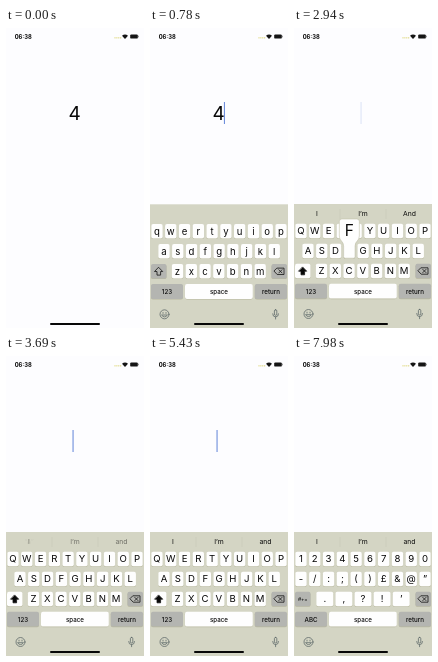
These frames come from a looping animation (138 px wide and 300 px high, 8 s). An HTML page:

```html
<!DOCTYPE html>
<html lang="en">
<head>
<meta charset="utf-8">
<title>Number field</title>
<style>
html, body { margin: 0; width: 100%; height: 100%; overflow: hidden; background: #fdfdff; }
svg { display: block; width: 138px; height: 300px; }
text { font-family: Inter, Roboto, sans-serif; text-anchor: middle; fill: #080808; }
.line { fill: none; stroke: #141414; stroke-width: .8; stroke-linejoin: round; stroke-linecap: round; }
.soft { fill: none; stroke: #5f6a6a; stroke-width: .8; stroke-linecap: round; }
</style>
</head>
<body>
<svg id="stage" viewBox="0 0 138 300"></svg>
<script>
const LOOP = 8000, WHITE = '#fefefe', GREY = '#b4b5b1', BOARD = '#d4d5c4';
const DELETE_AT = 1150, NUMBERS_AT = 7640;
const TYPED = 'AKSQFLDAJHVQDLFAKSQLGSLD', FIRST = 1945, STEP = 235, HOLD = 85;
const LETTERS = ['QWERTYUIOP', 'ASDFGHJKL', 'ZXCVBNM'];
const PITCH = 13.78;

const stage = document.getElementById('stage');
const clamp = v => Math.max(0, Math.min(1, v));
const ramp = (t, a, b) => clamp((t - a) / (b - a));

const label = (s, x, y, size, extra = '') =>
  `<text x="${x}" y="${y}" font-size="${size}" ${extra}>${s}</text>`;
const small = (s, x, y = 265.6) => label(s, x, y, 6.2, 'font-weight="500"');
const box = (x, y, w, h, fill, extra = '') =>
  `<rect x="${x}" y="${y}" width="${w}" height="${h}" rx="1.9" fill="${fill}" ${extra}/>`;
const key = (x, y, w, h, fill, extra = '') =>
  box(x, y + .6, w, h, '#b8b89e') + box(x, y, w, h, fill, extra);

function row(chars, x, y, pitch = PITCH, w = 11.4, size = 9.6) {
  return [...chars].map((c, i) => {
    const cx = x + i * pitch;
    return key(cx - w / 2, y, w, 14.4, WHITE) +
      label(c.replace('&', '&amp;'), cx, y + 10.5, size);
  }).join('');
}

const rowX = [7, 14, 27.5], rowY = [195.8, 215.8, 235.8];
const letterRows = f => LETTERS.map((s, i) => row(f(s), rowX[i], rowY[i])).join('');
const arrow = fill =>
  `<path class="line" style="fill:${fill}" d="M8.8 239.2 L12.7 243.2 H10.6 V246.8 H7 V243.2 H4.9 Z"/>`;
const cap = (fill, inner) => key(1, rowY[2], 15.5, 14.4, fill) + inner;

const layers = {
  lower: letterRows(s => s.toLowerCase()) + cap(GREY, arrow('none')) + small(123, 17),
  upper: letterRows(s => s) + cap(WHITE, arrow('#080808')) + small(123, 17),
  digits: row('1234567890', 7, rowY[0]) + row('-/:;()£&@”', 7, rowY[1]) +
    row('.,?!’', 30.8, rowY[2], 19.1, 17) + cap(GREY, label('#+=', 8.8, 245, 5)) +
    small('ABC', 17)
};

stage.innerHTML = `
<rect width="138" height="300" fill="#fdfdff"/>
${label('06:38', 17.2, 10.6, 5.8, 'font-weight="700"')}
<g fill="#d8cf62">${[0, 1, 2, 3].map(i => `<circle cx="${109 + i * 1.9}" cy="9.8" r=".65"/>`).join('')}</g>
<path d="M116 7.8 Q119 5 122 7.8 L119 11 Z" fill="#151515"/>
<rect x="124.2" y="6.4" width="7.6" height="4.2" rx="1.2" fill="#151515"/>
<rect x="132.2" y="7.7" width=".6" height="1.6" fill="#555"/>
${label(4, 68.7, 92, 19, 'id="value"')}
<rect id="caret" y="74" width="1.1" height="22" fill="#6f8fdc"/>
<g id="board">
  <rect y="176" width="138" height="124" fill="${BOARD}"/>
  <g id="bar">
    <path d="M46 181V191M92 181V191" stroke="#c6c7b4" stroke-width=".5"/>
    <g id="hints">${[23, 69, 115.5].map(x => label('', x, 188.3, 6.8)).join('')}</g>
    <g id="flash">${[23, 69, 115.5].map(x => label('', x, 188.3, 6.8)).join('')}</g>
  </g>
  ${key(121.5, rowY[2], 15.5, 14.4, GREY, 'id="erase"')}
  <path class="line" d="M127.2 239.8H134V246.2H127.2L124.2 243ZM128.8 241.4L132 244.6M132 241.4L128.8 244.6"/>
  ${key(1, 255.8, 32, 14.8, GREY, 'id="mode"')}
  ${key(35, 255.8, 67.8, 14.8, WHITE)}
  ${key(104.8, 255.8, 32.2, 14.8, GREY)}
  ${small('space', 69)}${small('return', 121)}
  ${Object.keys(layers).map(n => `<g id="${n}">${layers[n]}</g>`).join('')}
  <g class="soft">
    <circle cx="14.5" cy="286" r="4.5"/>
    <path d="M11.8 287Q14.5 290.5 17.2 287ZM13 284.2V285M16 284.2V285"/>
    <rect x="124.4" y="281.4" width="2.4" height="5.6" rx="1.2"/>
    <path d="M122.7 285.5Q122.7 288.6 125.6 288.6T128.5 285.5M125.6 288.6V290.7"/>
  </g>
  <g id="pop">
    <path fill="${WHITE}" stroke="#b8b89e" stroke-width=".5"
      d="M-7.5 -32H7.5Q10 -32 10 -29.5V-15C10 -10 5.7 -10 5.7 -5V5.6Q5.7 7.2 4 7.2H-4Q-5.7 7.2 -5.7 5.6V-5C-5.7 -10 -10 -10 -10 -15V-29.5Q-10 -32 -7.5 -32Z"/>
    ${label('', 0, -15.2, 15.5)}
  </g>
</g>
<rect x="44" y="295.1" width="50" height="1.9" rx=".95" fill="#080808"/>`;

const $ = id => document.getElementById(id);
const set = (id, name, v) => $(id).setAttribute(name, v);
const show = (id, on) => set(id, 'visibility', on ? 'visible' : 'hidden');
const write = (id, words) => words.forEach((w, i) => {
  const el = $(id).children[i];
  if (el.textContent !== w) el.textContent = w;
});

// Critically damped slide, as the system keyboard does.
function slide(t) {
  const s = Math.max(0, t - 110) * .0122;
  return t > 860 ? 0 : 124 * (1 + s) * Math.exp(-s);
}

function caretAlpha(t) {
  if (t < 150) return 0;
  if (t < 900 || (t > 6400 && t < 7370)) return 1;
  const p = t % 1000;
  return ramp(p, 240, 320) * (1 - ramp(p, 840, 970));
}

function drawTyping(t) {
  const i = Math.floor((t - FIRST) / STEP);
  const c = TYPED[i];
  const active = c && t < 7380;
  const age = t - FIRST - i * STEP;
  show('pop', active && age < HOLD);
  let old = 1, fresh = 0;
  if (active) {
    const r = LETTERS.findIndex(s => s.includes(c));
    const x = rowX[r] + LETTERS[r].indexOf(c) * PITCH;
    set('pop', 'transform', `translate(${x} ${rowY[r] + 7.2})`);
    $('pop').lastElementChild.textContent = c;
    const u = age - HOLD;
    fresh = ramp(u, 15, 45) * (1 - ramp(u, 60, 90));
    old = 1 - ramp(u, 0, 30) + ramp(u, 70, 110);
    write('flash', [`“${c}”`, c, 'and']);
  }
  set('hints', 'opacity', old);
  set('flash', 'opacity', fresh);
  write('hints', ['I', 'I’m', t < 3600 ? 'And' : 'and']);
}

function draw(t) {
  const empty = t >= DELETE_AT, digits = t >= NUMBERS_AT;
  set('board', 'transform', `translate(0 ${slide(t)})`);
  show('value', !empty);
  set('caret', 'x', empty ? 66.5 : 73.9);
  set('caret', 'opacity', caretAlpha(t));
  show('lower', !empty);
  show('upper', empty && !digits);
  show('digits', digits);
  set('bar', 'opacity', ramp(t, DELETE_AT + 30, DELETE_AT + 150));
  set('erase', 'fill', t > DELETE_AT - 30 && t < DELETE_AT + 90 ? WHITE : GREY);
  set('mode', 'fill', t > NUMBERS_AT - 20 && t < NUMBERS_AT + 90 ? WHITE : GREY);
  drawTyping(t);
}

const start = performance.now();
function tick() {
  draw((performance.now() - start) % LOOP);
  requestAnimationFrame(tick);
}
tick();
</script>
</body>
</html>
```
